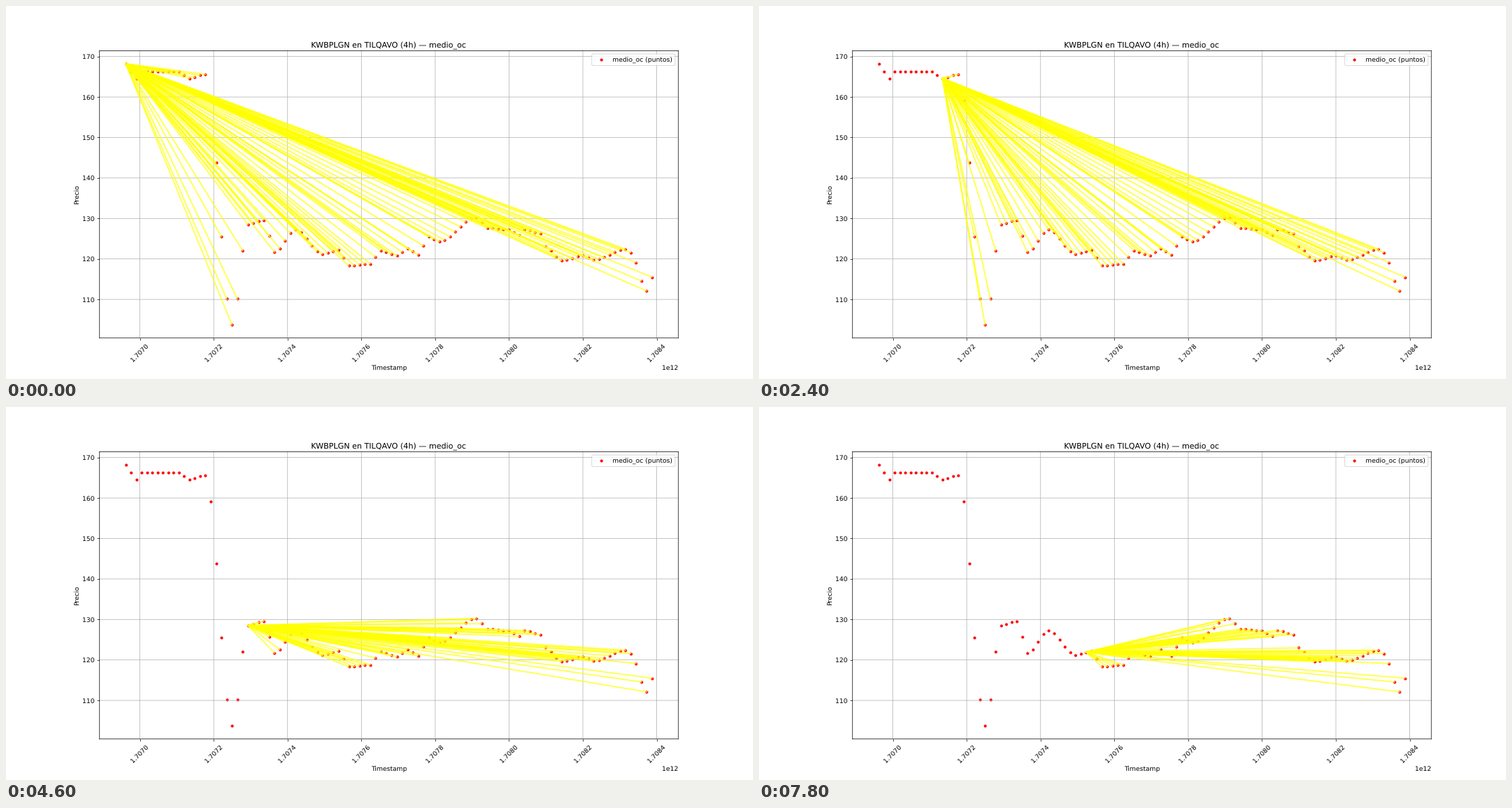
A matplotlib script for the animation above (8 s loop, 1058 by 529 pixels).

```python
import numpy as np
import matplotlib.pyplot as plt
from matplotlib.animation import FuncAnimation
from matplotlib.collections import LineCollection

FRAMES, STEP_MS = 40, 200
COUNT = 100
FOUR_HOURS = 4 * 3600 * 1000
START = 1706961600000

# Turning points of the price: candle number, price
TURNS = [
    (0, 168.2), (2, 164.5), (3, 166.3), (10, 166.3), (12, 164.6), (15, 165.6),
    (20, 103.7), (23, 128.5), (26, 129.6), (28, 121.7), (32, 127.2),
    (37, 121.2), (40, 122.2), (42, 118.3), (46, 118.8), (48, 122.1),
    (51, 120.8), (53, 122.6), (55, 121.0), (57, 125.5), (59, 124.3),
    (66, 130.3), (68, 127.6), (72, 127.3), (74, 125.8), (75, 127.3),
    (78, 126.3), (79, 123.0), (82, 119.6), (86, 120.8), (88, 119.7),
    (94, 122.4), (95, 121.6), (98, 112.1), (99, 115.5),
]


def ease_between(x, turns):
    """Run through the turning points, easing in and out of each one."""
    xs, ys = np.array(turns).T
    k = np.clip(np.searchsorted(xs, x, side="right") - 1, 0, len(xs) - 2)
    t = (x - xs[k]) / (xs[k + 1] - xs[k])
    return ys[k] + (ys[k + 1] - ys[k]) * t * t * (3 - 2 * t)


candles = np.arange(COUNT, dtype=float)
times = START + FOUR_HOURS * candles
prices = ease_between(candles, TURNS)
points = np.column_stack([times, prices])

# Soft subpixel placement of lines, dots and letters
plt.rcParams.update({"path.snap": False, "text.hinting": "none"})

fig, ax = plt.subplots(figsize=(16, 8), dpi=66.125)
ax.scatter(times, prices, s=12, color="red", label="medio_oc (puntos)",
           snap=False)
ax.set_title("KWBPLGN en TILQAVO (4h) — medio_oc")
ax.set_xlabel("Timestamp")
ax.set_ylabel("Precio")
ax.tick_params(axis="x", rotation=45)
ax.grid(True)
ax.legend(loc="upper right")

rays = LineCollection([], colors="yellow", linewidths=2, alpha=0.7,
                      capstyle="projecting", zorder=2)
ax.add_collection(rays, autolim=False)


def draw(i):
    """Connect point i to every later point."""
    rays.set_segments([(points[i], p) for p in points[i + 1:]])
    return [rays]


anim = FuncAnimation(fig, draw, frames=FRAMES, interval=STEP_MS,
                     init_func=lambda: draw(0), repeat=True)
plt.show()
```
